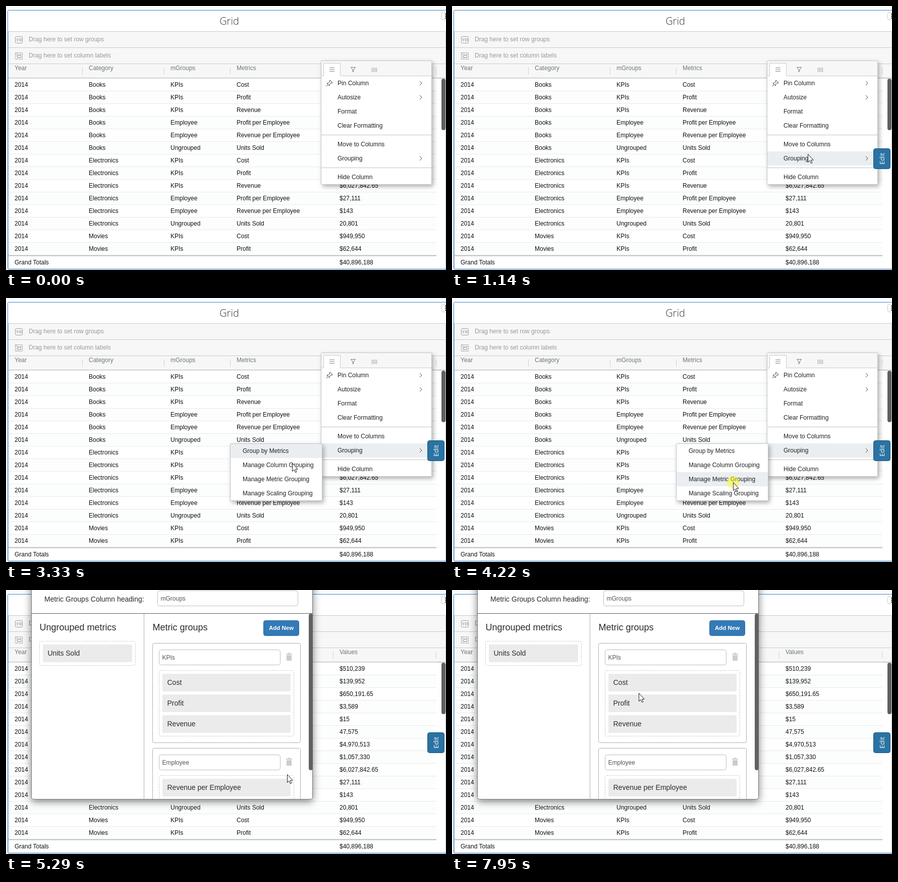
Animation, 872 px wide and 523 px high, one loop 8 s. Source, as an HTML page:

```html
<!DOCTYPE html>
<html lang="en">
<head>
<meta charset="utf-8">
<title>Grid grouping</title>
<style>
  html, body { margin: 0; width: 100%; height: 100%; overflow: hidden; background: #f9fafb; }
  svg { display: block; width: 872px; height: 523px; font: 12px "Liberation Sans", Arial, sans-serif; }
  text { white-space: pre; }
  .pop { filter: drop-shadow(3px 4px 4px rgba(0,0,0,.3)); }
  #dialog { filter: drop-shadow(0 4px 8px rgba(0,0,0,.5)); }
</style>
</head>
<body>
<svg id="stage" viewBox="0 0 872 523"></svg>
<script>
const LOOP = 8000;
const INK = '#111', SOFT = '#6d7677', PALE = '#949b9b', HOVER = '#eaeef0';

const text = (x, y, s, fill = INK, more = '') => `<text x="${x}" y="${y}" fill="${fill}" ${more}>${s}</text>`;
const rect = (x, y, w, h, fill, more = '') =>
  `<rect x="${x}" y="${y}" width="${w}" height="${h}" fill="${fill}" ${more}/>`;
const box = (x, y, w, h, fill, stroke, r = 0, more = '') =>
  rect(x + .5, y + .5, w - 1, h - 1, fill, `stroke="${stroke}" rx="${r}" ${more}`);
const path = (d, stroke, more = '') => `<path d="${d}" fill="none" stroke="${stroke}" ${more}/>`;
const group = (id, body, more = '') => `<g id="${id}" ${more}>${body}</g>`;

// ---- table ----
const columns = [17, 164, 326, 457, 661];
const metrics = [
  ['KPIs', 'Cost'], ['KPIs', 'Profit'], ['KPIs', 'Revenue'],
  ['Employee', 'Profit per Employee'], ['Employee', 'Revenue per Employee'], ['Ungrouped', 'Units Sold']
];
const categories = ['Books', 'Electronics', 'Movies'];
const values = ['$510,239', '$139,952', '$650,191.65', '$3,589', '$15', '47,575', '$4,970,513',
  '$1,057,330', '$6,027,842.65', '$27,111', '$143', '20,801', '$949,950', '$62,644'];

function table() {
  let s = box(3, 8, 880, 514, '#fff', '#3c8ad2', 2);
  s += rect(4, 50, 868, 93, '#f7f7f8');
  s += path('M4 50.5H872M4 82.5H872M4 114.5H872', '#c6cacc') + path('M871.5 50V521', '#c6cacc');
  s += path('M4.5 50V521', '#b4bcc3');
  s += text(442.5, 37, 'Grid', '#333',
    'text-anchor="middle" style="font:300 20px \'Open Sans\',\'Noto Sans\',sans-serif"');
  s += box(863, 12, 20, 16, '#fff', '#c4c8ca', 3);
  s += [15, 19, 23].map(y => rect(870, y, 2, 2, '#333')).join('');

  s += box(18, 60, 15, 14, 'none', '#9b9f9f', 2);
  s += path('M21 64l1.5 6l1.5-6M26.5 64v6M28.5 64v6M30.5 64v6', '#a5a9a9');
  s += path('M18.5 92.5H32.5V105.5H18.5Z', '#9b9f9f', 'stroke-dasharray="3 1"');
  s += path('M18 95.5H33M21.5 92V106', '#a5a9a9', 'stroke-dasharray="2 1"') + box(23, 97, 7, 6, '#fff', '#8f9393');
  s += text(45, 70, 'Drag here to set row groups', PALE) + text(45, 102, 'Drag here to set column labels', PALE);

  s += ['Year', 'Category', 'mGroups', 'Metrics', 'Values'].map((h, i) => text(columns[i], 127, h, SOFT)).join('');
  s += path([151, 313, 444, 648, 852].map(x => `M${x}.5 122V136`).join(''), '#cdd1d3');
  s += rect(5, 142, 866, 1.6, '#b9bec1');

  values.forEach((_, i) => {
    const y = 143.5 + i * 25;
    s += rect(5, y, 848, 25, i % 2 ? '#fcfdfd' : '#fff');
    if (i < 13) s += path(`M5 ${y + 25}H853`, '#d3d7d9');
  });
  s += rect(5, 493.5, 848, 2, '#b9bec1') + path('M5 520.5H871', '#d3d7d9');
  s += rect(5, 144, 848, 24, HOVER, 'id="rowHover"');
  values.forEach((v, i) => {
    const cells = ['2014', categories[Math.floor(i / 6)], ...metrics[i % 6], v];
    cells.forEach((c, j) => s += text(columns[j], 160 + i * 25, c));
  });
  s += text(17, 512, 'Grand Totals') + text(661, 512, '$40,896,188');
  return s + rect(863, 144, 8, 102, '#5f5f5f', 'rx="4"');
}

// ---- menus ----
function menu() {
  let s = box(624, 108, 220, 246, '#fff', '#c2c6c8', 1, 'class="pop"');
  s += rect(625, 109, 218, 29, '#f7f7f8') + path('M625 138.5H843', '#c6cacc');
  s += rect(629, 113, 34, 26, '#fff') + path('M629.5 138.5V113.5H662.5V138.5', '#c6cacc');
  s += path('M641 122.5H651M641 126H651M641 129.5H651', '#888');
  s += path('M683.5 121.5H692.5L689 126V129.5L687 130.5V126Z', '#777');
  s += path('M725.5 122V131M728.5 122V131M731.5 122V131M734.5 122V131', '#999');
  s += path('M642 147L647 152L645.5 153L644 152.5L641.5 155L641 158L636 153L639 152.5L641.5 150L641 148.5ZM638.5 155.5L635 159', '#333');
  s += rect(625, 288, 218, 28, HOVER, 'id="menuHover"');
  s += path('M625 255.5H843M625 320.5H843', '#bfc4c6');
  s += path([153, 181, 302].map(y => `M820 ${y - 4}l4 4l-4 4`).join(''), '#444');
  const items = [['Pin Column', 157], ['Autosize', 185], ['Format', 213], ['Clear Formatting', 241],
    ['Move to Columns', 278], ['Grouping', 306], ['Hide Column', 343]];
  return s + items.map(([label, y]) => text(657, y, label, '#222')).join('');
}

function submenu() {
  const items = ['Group by Metrics', 'Manage Column Grouping', 'Manage Metric Grouping', 'Manage Scaling Grouping'];
  return box(444, 288, 183, 114, '#fff', '#bfc4c6', 1, 'class="pop"')
    + rect(445, 289, 181, 28, HOVER, 'id="subHover"')
    + items.map((label, i) => text(469, 307 + i * 28, label, '#222')).join('');
}

// ---- dialog ----
const big = (x, y, s, size = 14) => text(x, y, s, '#2b2b2b', `font-size="${size}"`);
const field = (x, y, w, s) => box(x, y, w, 31, '#fff', '#bdbdbd', 4) + text(x + 6.5, y + 20, s, '#555');
const chip = (x, y, w, s) => rect(x, y, w, 35, '#ebebeb', 'rx="2"') + big(x + 9.5, y + 22, s);
const dashed = (x, y, w, h) => box(x, y, w, h, 'none', '#c8c8c8', 3, 'stroke-dasharray="3 2"');

function card(y, name, chips) {
  const h = chips.length * 41;
  return box(290, y, 294, h + 75, '#fff', '#b0b0b0', 3) + field(303, y + 13, 241, name)
    + rect(555, y + 21, 12, 2, '#ccc') + rect(559, y + 19.5, 4, 2, '#ccc') + rect(556, y + 24, 10, 11, '#ccc', 'rx="1"')
    + dashed(303, y + 54, 268, h + 8)
    + chips.map((c, i) => chip(310, y + 61 + i * 41, 254, c)).join('');
}

function dialog() {
  let s = box(50, -20, 558, 435, '#fff', '#777', 4);
  s += big(76, 23, 'Metric Groups Column heading:') + field(300, 1, 279, 'mGroups');
  s += path('M50 46.5H608', '#5a5a5a') + path('M273.5 47V415', '#b0b0b0');
  s += big(66.5, 80, 'Ungrouped metrics', 18) + big(290.5, 80, 'Metric groups', 18);
  s += dashed(66, 101, 191, 49) + chip(73, 108, 177, 'Units Sold');
  s += box(510, 60, 71, 31, '#337ab7', '#2e6da4', 4);
  s += text(545.5, 79, 'Add New', '#fff', 'text-anchor="middle" font-weight="bold" font-size="11.5"');
  s += `<g clip-path="url(#inside)">${card(105, 'KPIs', ['Cost', 'Profit', 'Revenue'])}${
    card(313, 'Employee', ['Revenue per Employee', 'Profit per Employee'])}</g>`;
  return s + rect(600, 47, 8, 310, '#616161', 'rx="4"');
}

const edit = box(835, 282, 34, 41, '#2a73a3', '#1c5680', 4)
  + text(0, 0, 'Edit', '#fff', `transform="translate(856.5 302.5) rotate(-90)" text-anchor="middle"
    style="font:13px 'Open Sans','Noto Sans',sans-serif"`);
const arrow = '<path d="M.5 .5V16.5L4 13.2L6.5 18.6L8.9 17.6L6.5 12.2H11.2Z" fill="#fff" stroke="#1a1a2e"/>';

const stage = document.getElementById('stage');
stage.innerHTML = '<defs><clipPath id="inside"><path d="M51 47H607V414H51Z"/></clipPath></defs>'
  + table() + group('menu', menu()) + group('submenu', submenu()) + group('edit', edit)
  + group('dialog', dialog()) + '<circle id="click" r="12" fill="#ff0" fill-opacity=".47"/>' + group('pointer', arrow);
const el = {};
stage.querySelectorAll('[id]').forEach(e => el[e.id] = e);

// ---- motion: [start, end, steps, points spread evenly over the steps] ----
const moves = [
  [520, 1140, 10, [[768, 508], [762, 480], [752, 440], [737, 362], [726, 343], [716, 311], [710, 302], [707, 297], [705, 294], [705, 293]]],
  [1470, 2220, 11, [[705, 293], [705, 293], [700, 295], [676, 300], [657, 302], [657, 302]]],
  [2290, 2360, 2, [[626, 302], [625, 302]]],
  [2690, 3470, 11, [[622, 302], [615, 302], [608, 303], [600, 303], [592, 304], [584, 306], [577, 309], [571, 315], [567, 327], [561, 346], [558, 358]]],
  [3540, 3940, 5, [[557, 360], [557, 365]]],
  [6770, 7530, 12, [[536, 378], [500, 396], [440, 400], [375, 375], [320, 320], [285, 250], [279, 190], [310, 140], [365, 114], [420, 140], [455, 195], [457, 240]]],
  [7600, 7950, 6, [[450, 253], [410, 240], [365, 205], [351, 170], [362, 156], [370, 204]]]
];

function along(points, u) {
  const f = u * (points.length - 1), i = Math.min(Math.floor(f), points.length - 2);
  return points[i].map((a, j) => a + (points[i + 1][j] - a) * (f - i));
}

// Pointer now and one step earlier; hover states trail by that step.
function pointerAt(t) {
  const move = moves.filter(m => t >= m[0]).pop();
  if (!move) return null;
  const [start, end, steps, points] = move, last = steps - 1;
  const k = Math.min(last, Math.floor((t - start + 10) / ((end - start) / last)));
  return [along(points, k / last), along(points, Math.max(0, k - 1) / last)];
}

const show = (e, on) => e.setAttribute('visibility', on ? 'visible' : 'hidden');
const within = (t, a, b) => t >= a && t < b;

function draw(t) {
  const p = pointerAt(t), menuOpen = t < 5020, subOpen = within(t, 1610, 5020);
  const [hx, hy] = p ? p[1] : [0, 0];
  el.menu.style.display = menuOpen ? '' : 'none';
  el.submenu.style.display = subOpen ? '' : 'none';
  show(el.edit, p);
  show(el.pointer, p);
  if (p) el.pointer.setAttribute('transform', `translate(${p[0].map(Math.round)})`);

  show(el.rowHover, p && menuOpen && hx > 627 && hy > 353);
  el.rowHover.setAttribute('y', hy > 493 ? 496 : 144 + 25 * Math.floor((hy - 143.5) / 25));
  show(el.menuHover, p && menuOpen && (subOpen || hy <= 353));
  el.menuHover.setAttribute('y', !subOpen && hy > 323 ? 325 : 288);
  show(el.subHover, subOpen && hx <= 627);
  el.subHover.setAttribute('y', 289 + 28 * Math.floor((hy - 289) / 28));

  const first = within(t, 1470, 1680);
  show(el.click, first || within(t, 4220, 4490));
  el.click.setAttribute('cx', first ? 705 : 557);
  el.click.setAttribute('cy', first ? 293 : 365);

  el.dialog.style.display = t < 5220 ? 'none' : '';
  el.dialog.style.opacity = t < 5290 ? .5 : 1;
}

const begin = performance.now();
function tick(now) {
  draw(Math.max(0, now - begin) % LOOP);
  requestAnimationFrame(tick);
}
draw(0);
requestAnimationFrame(tick);
</script>
</body>
</html>
```
